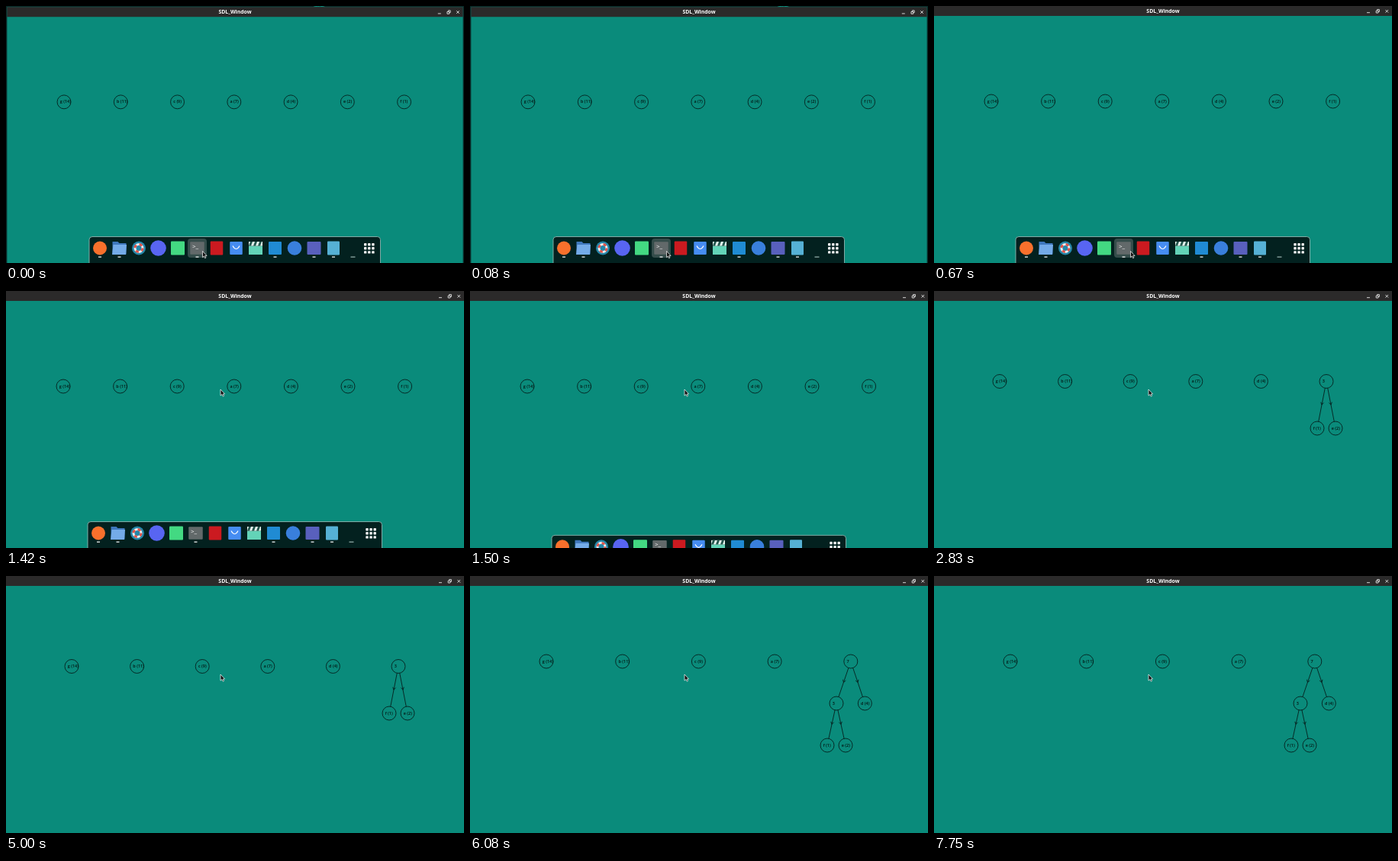
An HTML page that plays this animation: 600x337 px, repeating every 8000 ms.

```html
<!DOCTYPE html>
<html>
<head>
<meta charset="utf-8">
<style>
html, body { margin: 0; width: 100%; height: 100%; overflow: hidden; background: #082623; }
svg { display: block; width: 100vw; height: 100vh; }
text { font-family: "Open Sans", "Noto Sans", sans-serif; font-weight: 700; }
.node { fill: none; stroke: #06201d; stroke-width: .9; }
.label { font-size: 5.5px; font-weight: 600; fill: #031512; }
.controls { fill: none; stroke: #e8e8e8; stroke-width: .9; }
</style>
</head>
<body>
<svg viewBox="0 0 600 337" preserveAspectRatio="none">
  <path d="M403 1.2Q412-1 418 1.5" fill="none" stroke="#0f9a89"/>
  <g id="win">
    <rect width="600" height="338" fill="#0a8b7b"/>
    <rect width="600" height="13" fill="#2b2a2a"/>
    <text x="300" y="9" font-size="6.9" fill="#fff" text-anchor="middle">SDL_Window</text>
    <path class="controls" d="M567 8.7h4M579.2 6.2h2.8v2.8h-2.8zM580.6 5.9v-1.3h2.8v2.8h-1.3M591.5 5l3.6 3.6m0-3.6l-3.6 3.6"/>
    <g id="trees"></g>
  </g>
  <g id="dock">
    <rect id="panel" y="302.5" height="42" rx="4" fill="#03211f" stroke="#8fb5af" stroke-width=".9"/>
    <g id="icons"></g>
    <g id="grid" fill="#f2f2f2"></g>
  </g>
  <path id="cursor" d="M0 0V8.2L1.9 6.5L3.1 9.2L4.5 8.6L3.3 6H5.6Z" fill="#111" stroke="#fff" stroke-width=".7"/>
</svg>
<script>
const $ = id => document.getElementById(id);
const clamp = v => Math.max(0, Math.min(1, v));
const ramp = (t, start, end) => clamp((t - start) / (end - start));
const smooth = p => p * p * (3 - 2 * p);
const lerp = (a, b, p) => a + (b - a) * p;
const R = 9;

const node = (x, y, label) =>
  `<circle class="node" cx="${x}" cy="${y}" r="${R}"/><text class="label" x="${x - 5.3}" y="${y + 1.5}">${label}</text>`;

// Line between two circle rims with an open arrowhead halfway
function edge(x1, y1, x2, y2) {
  const d = Math.hypot(x2 - x1, y2 - y1), ux = (x2 - x1) / d, uy = (y2 - y1) / d;
  const mx = (x1 + x2) / 2, my = (y1 + y2) / 2;
  const arm = s => `${mx - ux * 3.2 + s * uy * 2} ${my - uy * 3.2 - s * ux * 2}`;
  return `<path class="node" d="M${x1 + ux * R} ${y1 + uy * R}L${x2 - ux * R} ${y2 - uy * R}M${arm(1)}L${mx} ${my}L${arm(-1)}"/>`;
}
const child = (px, py, x, y, label) => edge(px, py, x, y) + node(x, y, label);
const row = (labels, x, step, y) => labels.map((s, i) => node(x + step * i, y, s)).join("");

const letters = ["g (14)", "b (11)", "c (9)", "a (7)", "d (4)", "e (2)", "f (1)"];
const stages = [
  row(letters, 75, 74.6, 125),
  row([...letters.slice(0, 5), "3"], 86, 85.6, 118.5) +
    child(514, 118.5, 502, 180, "f (1)") + child(514, 118.5, 526, 180, "e (2)"),
  row([...letters.slice(0, 4), "7"], 100, 99.7, 112) +
    child(498.8, 112, 480, 167, "3") + child(498.8, 112, 517.3, 167, "d (4)") +
    child(480, 167, 468, 222, "f (1)") + child(480, 167, 492, 222, "e (2)")
];
$("trees").innerHTML = stages.map(s => `<g>${s}</g>`).join("");

// Icons are drawn around 0,0
const disc = (color, r = 9.5) => `<circle r="${r}" fill="${color}"/>`;
const box = (color, w = 17, h = 17) =>
  `<rect x="${-w / 2}" y="${-h / 2}" width="${w}" height="${h}" rx="1" fill="${color}"/>`;
const icons = [
  disc("#f8702c", 9),
  `<path d="M-9-8.5h7l2 2h9V8h-18z" fill="#3f78bd"/><path d="M-8-4.5h17.5L8.5 8.5H-9.5z" fill="#74abe8"/>`,
  disc("#2586a8", 9) + `<g fill="none" stroke-width="3"><circle r="5" stroke="#e9eef0"/><circle r="5" stroke="#df5148" stroke-dasharray="3.93"/></g>`,
  disc("#5865f2", 10.3),
  box("#43d982", 18, 18),
  `<rect id="hover" x="-12.5" y="-12.5" width="25" height="25" rx="4" fill="#fff" opacity=".2"/>` +
    box("#62696a", 18.5, 16.5) + `<text x="-6.5" y="0" font-size="8" fill="#fff" style="font-weight:400">&gt;_</text>`,
  box("#cb1a20", 16.5, 18),
  box("#468df2", 16.5, 17) + `<path d="M-4.5-3Q0 5 4.5-3" fill="none" stroke="#fff" stroke-width="1.2"/>`,
  `<path d="M-9-3H9V8.5H-9z" fill="#63d3b7"/><path d="M-9-8.5H9V-3H-9z" fill="#e6f5ef"/>` +
    `<path d="M-7-8.5h3L-6-3h-3zM-1-8.5h3L0-3h-3zM5-8.5h3L6-3H3z" fill="#24564e"/>`,
  box("#208bd3", 17, 17),
  disc("#397fdc", 9.3),
  box("#5960bd", 18, 17),
  box("#56b1d5", 16, 18),
  ""
];
const running = [0, 1, 5, 9, 11, 12, 13];
$("icons").innerHTML = icons.map((art, i) => {
  const w = i == 13 ? 6 : 4;
  const mark = running.includes(i) ? `<rect x="${-w / 2}" y="11" width="${w}" height="1.2" fill="${i == 13 ? "#9bb5b1" : "#fff"}"/>` : "";
  return `<g transform="translate(${121 + 25.5 * i} 317.5)">${art}${mark}</g>`;
}).join("");
for (let i = 0; i < 9; i++)
  $("grid").innerHTML += `<rect x="${471.3 + i % 3 * 5.1}" y="${311 + Math.floor(i / 3) * 5.1}" width="3.4" height="3.4" rx=".7"/>`;

function draw(t) {
  const open = smooth(ramp(t, 80, 220));
  $("win").setAttribute("transform",
    `translate(${lerp(1.35, 0, open)} ${lerp(1.3, 0, open)}) scale(${lerp(.9955, 1, open)} ${lerp(.9962, 1, open)})`);

  const inset = lerp(2, 0, smooth(ramp(t, 80, 260)));
  $("panel").setAttribute("x", 107 + inset);
  $("panel").setAttribute("width", 385.5 - 2 * inset);
  $("icons").setAttribute("transform", `translate(${inset})`);
  $("grid").setAttribute("transform", `translate(${-1.15 * inset})`);
  $("dock").setAttribute("transform", `translate(0 ${38 * ramp(t, 1440, 1570)})`);

  const move = smooth(ramp(t, 930, 1330));
  const y = lerp(321.5, 129, move);
  $("cursor").setAttribute("transform", `translate(${lerp(257.5, 281, move)} ${y})`);
  $("hover").style.display = y > 302 ? "" : "none";

  const stage = t < 2420 ? 0 : t < 5670 ? 1 : 2;
  [...$("trees").children].forEach((g, i) => g.style.display = i == stage ? "" : "none");
}
function tick() {
  draw(performance.now() % 8000);
  requestAnimationFrame(tick);
}
tick();
</script>
</body>
</html>
```
